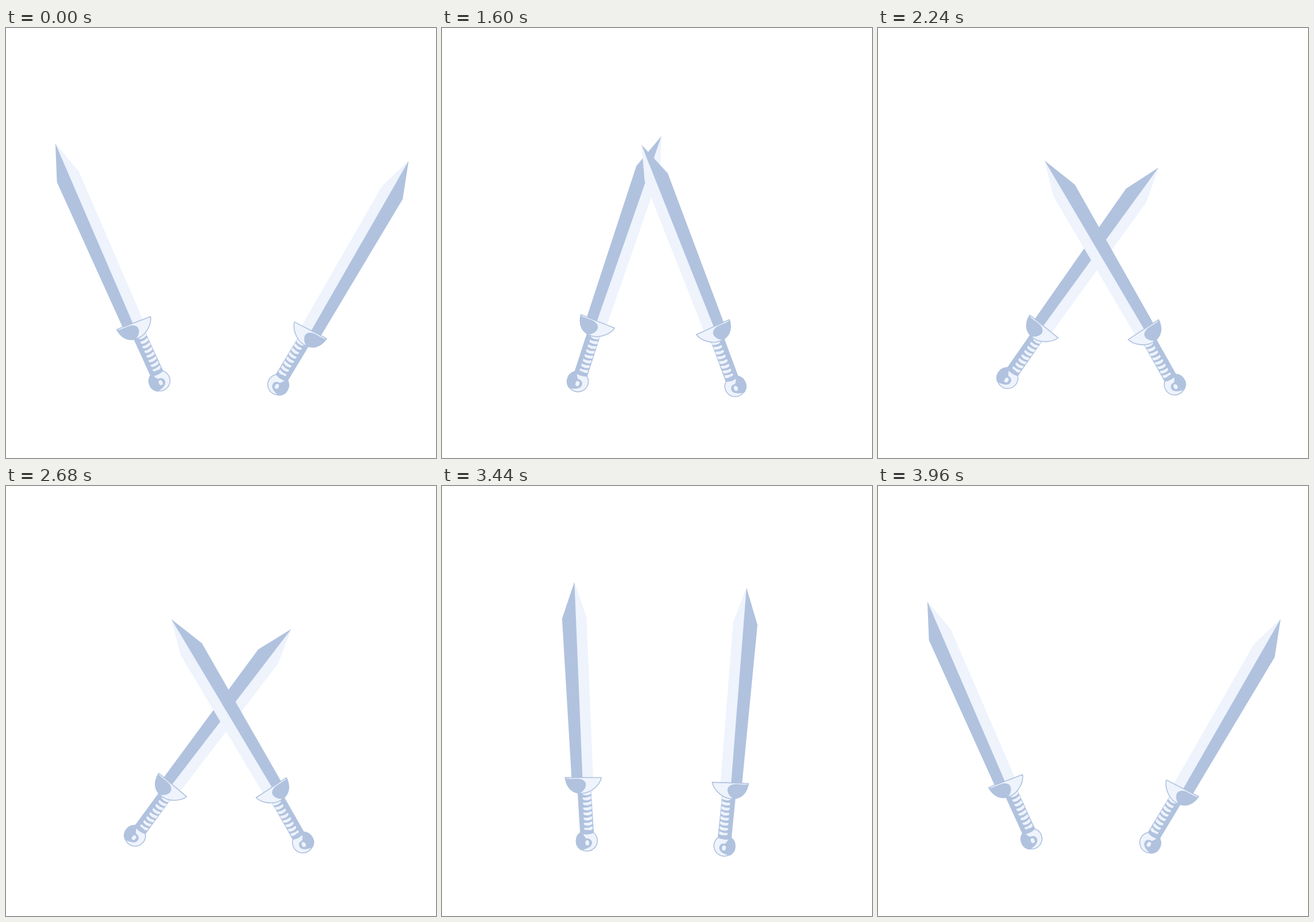
An HTML page for the animation above (4 s loop, 748 px wide and 748 px high).

```html
<!DOCTYPE html>
<html lang="en">
<head>
<meta charset="utf-8">
<title>Crossing swords</title>
<style>
  html, body { margin: 0; width: 100%; height: 100%; overflow: hidden; background: #fff; }
  svg { display: block; width: 100vw; height: 100vh; }
  .dark { fill: #b0c2de; }
  .light { fill: #eef3fc; }
  .edge { stroke: #b0c2de; stroke-width: 1.6; stroke-linejoin: round; }
</style>
</head>
<body>
<svg viewBox="0 0 748 748">
  <defs>
    <!-- origin at the pivot in the grip, tip pointing up -->
    <g id="sword">
      <path class="light" d="M0-408.4L17.8-347L16-64H-3Z"/>
      <path class="dark" d="M0-408.4L-24.6-345.5L-21.5-64H-2.4L-2.5-70Z"/>
      <path class="dark" d="M-12.4-46L-11.3 31H12.6L11.4-46Z"/>
      <g id="wraps" class="light"></g>
      <circle class="light edge" cy="42.4" r="18"/>
      <path class="dark" d="M-11 58.5C-2 57 8.5 54 8.5 46C8.5 40 3 38 -1 38.5C-4 36 -6 31 -8 25.5A18.6 18.6 0 0 0 -11 58.5Z"/>
      <path class="dark" d="M-11.3 25L12.2 25.5L11.8 29.5Q0 34 -11 29Z"/>
      <ellipse class="light" cx=".3" cy="46.2" rx="3.4" ry="4.5"/>
      <path class="light edge" d="M-32.6-69.3L30.4-66C27-54 12-40 -5-40.3C-20-41 -31-50 -32.6-69.3Z"/>
      <path class="dark" d="M-32.6-68C-25-65.5 -16-67 -8-65.8C0-64 4-59 2.5-53C1-47 -4-43 -9-40.5C-22-42 -31-51 -32.6-68Z"/>
    </g>
  </defs>
  <use id="left" href="#sword"/>
  <use id="right" href="#sword"/>
</svg>
<script>
const $ = id => document.getElementById(id);
const LOOP = 4000, STEP = 40;

let wraps = "";
for (let i = 0; i < 8; i++) {
  const y = -43 + i * 8.8;
  wraps += `M-3.5 ${y + 1}Q4 ${y + 2.5} 10.6 ${y - 1}L11 ${y + 4}Q5 ${y + 7.6} -2 ${y + 5.6}Q-5 ${y + 4} -3.5 ${y + 1}Z`;
}
$("wraps").innerHTML = `<path d="${wraps}"/>`;

// poses: [left angle, right angle]
const rest = [-23.73, 30.25], near = [24, -27.5], far = [48.7, -33.1];
const swing = [0.44, 0.56], settle = [0.3, 0.18];
// time in ms, pose, easing towards that pose
const keys = [
  [1422, rest],
  [1655, near, swing],
  [1975, far, swing],
  [2488, near, swing],
  [2860, far, swing],
  [3180, near, swing],
  [3960, rest, settle]
];

// cubic bezier easing with handles (x1, 0) and (x2, 1)
function ease(x, [x1, x2]) {
  let lo = 0, hi = 1;
  for (let i = 0; i < 24; i++) {
    const s = (lo + hi) / 2, r = 1 - s;
    if (3 * r * r * s * x1 + 3 * r * s * s * x2 + s * s * s < x) lo = s; else hi = s;
  }
  return lo * lo * (3 - 2 * lo);
}

function poseAt(t) {
  const i = keys.findIndex(k => t < k[0]);
  if (i < 1) return rest;
  const [t0, from] = keys[i - 1], [t1, to, curve] = keys[i];
  const k = ease((t - t0) / (t1 - t0), curve);
  return from.map((a, n) => a + (to[n] - a) * k);
}

function draw(ms) {
  const [l, r] = poseAt(Math.floor(ms % LOOP / STEP) * STEP);
  $("left").setAttribute("transform", `translate(250.2 574.7) rotate(${l})`);
  $("right").setAttribute("transform", `translate(494.7 583.7) rotate(${r}) scale(-1 1)`);
}

const start = performance.now();
function tick() {
  draw(performance.now() - start);
  requestAnimationFrame(tick);
}
tick();
</script>
</body>
</html>
```
